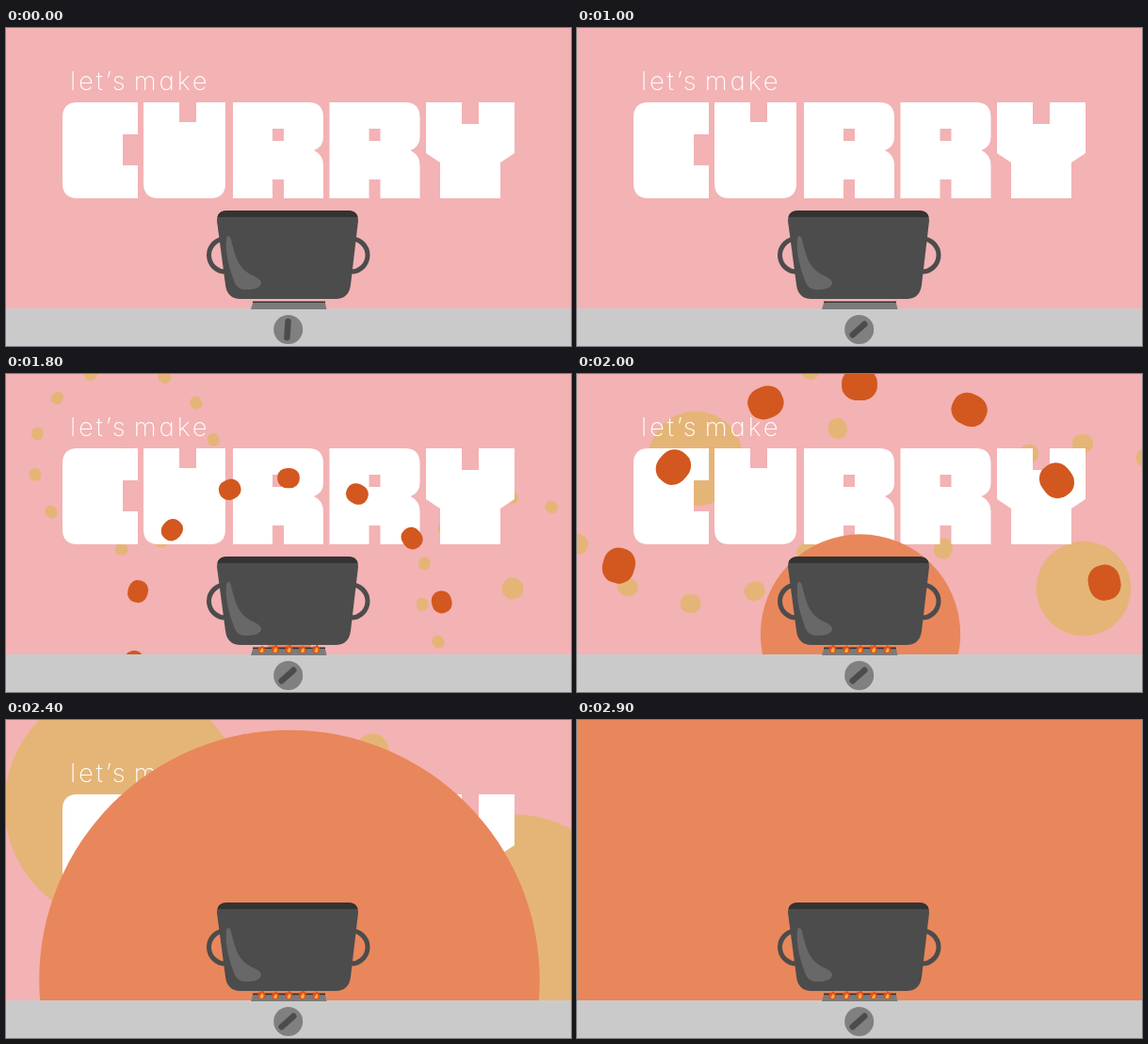
An HTML page for the animation above (3000 ms loop, 600 by 338 pixels).

```html
<!DOCTYPE html>
<html lang="en">
<head>
<meta charset="utf-8">
<title>Let's make curry</title>
<style>
  html, body { margin: 0; height: 100%; overflow: hidden; background: #f3b2b4; }
  svg { display: block; width: 100vw; height: 100vh; }
  text {
    font: 200 27.5px Inter, Lato, sans-serif;
    font-feature-settings: "cv11";
    letter-spacing: 2.8px;
    word-spacing: -4px;
  }
</style>
</head>
<body>
<svg viewBox="0 0 600 338">
  <defs>
    <g id="ring"></g>
    <path id="letterR" d="M0 79H80Q96 79 96 95V116Q96 126 86 130Q96 135 96 146V181H54V161H42V181H0Z
      M42 107V120H54V107Z" fill-rule="evenodd"/>
    <g id="flame">
      <path d="M0-9Q4-6 4-3.500A4 3.800 0 0 1-4-3.500Q-4-6-2.500-7.500L-1-6Z" fill="#e0501f"/>
      <path d="M.5-6Q2.300-4 2-2.500A2 2 0 0 1-2-2.500Q-1-3.500 .5-6Z" fill="#f9b13a"/>
    </g>
    <clipPath id="potShape">
      <path id="pot" d="M224 205Q224 194 235 194H363Q374 194 374 205L366 273Q364 288 350 288H249Q235 288 233 273Z"/>
    </clipPath>
  </defs>

  <rect width="600" height="338" fill="#f3b2b4"/>
  <g fill="#e5b577">
    <circle class="disc" cx="126" cy="90"/>
    <circle class="disc" cx="538" cy="228"/>
    <use href="#ring" class="burst" data-x="126" data-y="90" data-speed=".2885"/>
    <use href="#ring" class="burst" data-x="537" data-y="228" data-speed=".2885"/>
  </g>

  <g fill="#fff">
    <text x="68" y="65.500">let’s make</text>
    <path d="M76 79H140V113H124V146H140V181H76Q60 181 60 165V95Q60 79 76 79Z"/>
    <path d="M146 79H184V100H202V79H233V165Q233 181 217 181H162Q146 181 146 165Z"/>
    <use href="#letterR" x="241"/>
    <use href="#letterR" x="343.500"/>
    <path d="M446 79H484V102H502V79H540V133L525 143V181H461V143L446 133Z"/>
  </g>

  <use href="#ring" class="burst" fill="#d2581f" data-x="300" data-y="277" data-speed=".498"/>
  <circle id="heat" cx="301" cy="276.500" fill="#e8875b"/>

  <path d="M0 298H600V338H0Z" fill="#cbcacb"/>
  <path d="M262 290.500H339V292.500H262Z" fill="#333"/>
  <path d="M262 292.500H339L340.500 299H260Z" fill="#7b7b7b"/>
  <g id="flames"></g>

  <g fill="none" stroke="#4c4c4c" stroke-width="5">
    <circle cx="233" cy="241.500" r="17.500"/>
    <circle cx="366.500" cy="241.500" r="17.500"/>
  </g>
  <use href="#pot" fill="#4c4c4c"/>
  <path d="M220 190H380V201H220Z" fill="#333" clip-path="url(#potShape)"/>
  <path d="M236 221Q238 221 239 225C244 246 248 257 262 263Q271 267 271 271Q270 278 256 278Q247 279 243 271Q232 243 234 225Q234 221 236 221Z" fill="#686868"/>

  <circle cx="299.700" cy="320.500" r="15.500" fill="#808080"/>
  <path id="knob" d="M0-8.500V8.500" stroke="#4c4c4c" stroke-width="6.500" stroke-linecap="round"/>
</svg>
<script>
const LOOP = 3000, STEP = 100;
const svgNS = "http://www.w3.org/2000/svg";
const $ = id => document.getElementById(id);
const all = selector => [...document.querySelectorAll(selector)];
const clamp = (v, lo, hi) => Math.min(hi, Math.max(lo, v));

function add(parent, tag, attrs) {
  const el = document.createElementNS(svgNS, tag);
  for (const key in attrs) el.setAttribute(key, attrs[key]);
  return parent.appendChild(el);
}

// Fourteen rounded blobs on a circle of radius 100
for (let i = 0; i < 14; i++) {
  add($("ring"), "rect", {
    x: -7.1, y: -106.4, width: 14.2, height: 12.8, rx: 6.3, ry: 5.7,
    transform: `rotate(${26 * i})`
  });
}
const flames = [271.5, 286, 300.5, 315, 329.5].map(x => ({
  x, el: add($("flames"), "use", { href: "#flame" })
}));
const bursts = all(".burst"), discs = all(".disc");

function draw(t) {
  const turn = 4 + 44 * clamp(t / 1000, 0, 1);
  $("knob").setAttribute("transform", `translate(299 320.500) rotate(${turn})`);

  const burstAge = Math.max(0, t - 1466);
  for (const el of bursts) {
    const { x, y, speed } = el.dataset;
    el.setAttribute("transform", `translate(${x} ${y}) scale(${burstAge * speed / 100})`);
  }

  for (const el of discs) el.setAttribute("r", Math.max(0, (t - 1741) * 0.194));
  $("heat").setAttribute("r", Math.max(0, (t - 1734) * 0.399));

  const grow = clamp((t - 1100) / 600, 0, 1);
  flames.forEach(({ x, el }, i) => {
    const flicker = 1 + 0.1 * Math.sin(t / 60 + i * 2);
    const spread = 300.5 + (x - 300.5) * (0.65 + 0.35 * grow);
    el.setAttribute("transform", `translate(${spread} 296.500) scale(${grow} ${grow * flicker})`);
  });
}

function tick() {
  const t = performance.now() % LOOP;
  draw(Math.floor(t / STEP) * STEP);
  requestAnimationFrame(tick);
}
tick();
</script>
</body>
</html>
```
